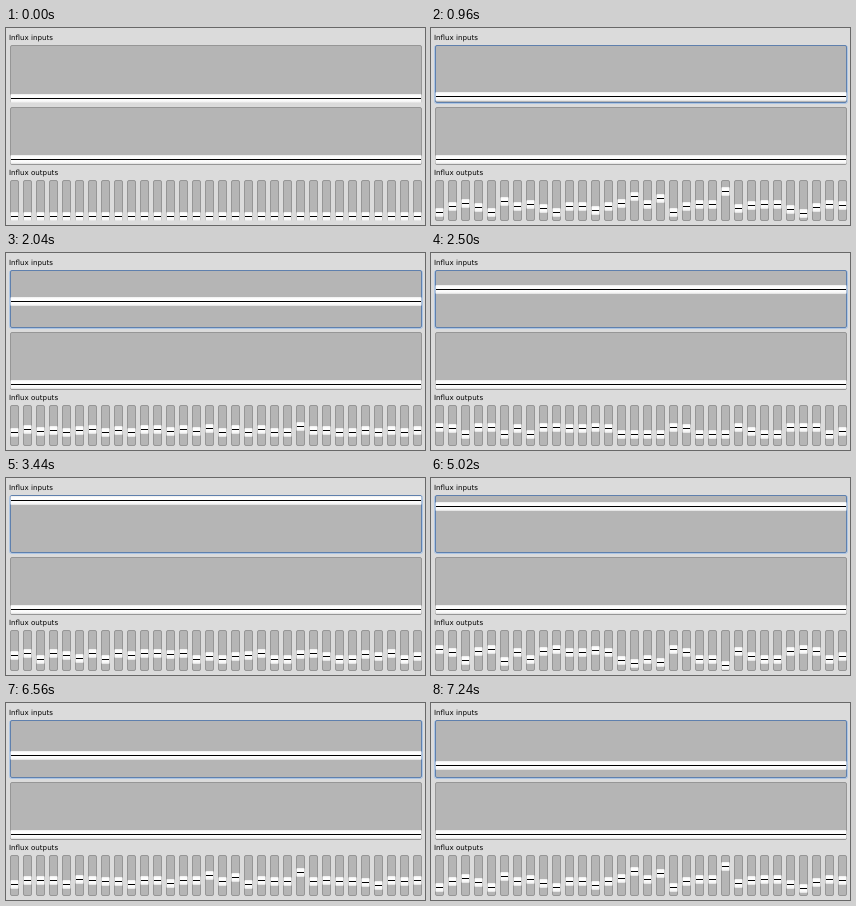
Recreate the animation shown at these times as an HTML page. Size 419 by 197 pixels, loop 8 s.

```html
<!DOCTYPE html>
<html lang="en">
<head>
<meta charset="utf-8">
<title>Influx sliders</title>
<style>
  html, body { margin: 0; width: 100%; height: 100%; overflow: hidden; background: #dbdbdb; }
  svg { display: block; width: 419px; height: 197px; }
  text { font: 7.1px "DejaVu Sans", sans-serif; fill: #000; text-rendering: geometricPrecision; }
  .track { fill: #b5b5b5; stroke: #969696; }
  .focus { stroke: #5f80ad; }
  .glow { fill: none; stroke: #8db6ea; stroke-opacity: .6; }
  .knob { fill: url(#face); }
</style>
</head>
<body>
<svg id="stage" viewBox="0 0 419 197">
  <defs>
    <linearGradient id="face" x1="0" y1="0" x2="0" y2="1">
      <stop offset="0" stop-color="#ececec"/>
      <stop offset=".2" stop-color="#fff"/>
      <stop offset=".8" stop-color="#fafafa"/>
      <stop offset="1" stop-color="#dedede"/>
    </linearGradient>
  </defs>
  <text x="3" y="12">Influx inputs</text>
  <text x="3" y="147">Influx outputs</text>
</svg>
<script>
const LOOP = 8000, GRAB = 500;
const stage = document.getElementById('stage');

function add(name, attrs, parent = stage) {
  const el = document.createElementNS('http://www.w3.org/2000/svg', name);
  for (const key in attrs) el.setAttribute(key, attrs[key]);
  return parent.appendChild(el);
}

function slider(x, y, w, h) {
  const track = add('rect', { class: 'track', x: x + .5, y: y + .5, width: w - 1, height: h - 1, rx: 1.5 });
  const knob = add('g', {});
  add('rect', { class: 'knob', x: x + .5, y: -4, width: w - 1, height: 9, rx: 1 }, knob);
  add('rect', { x: x + 1, y: 0, width: w - 2, height: 1 }, knob);
  return { track, move: pos => knob.setAttribute('transform', `translate(0 ${Math.round(pos)})`) };
}

const glow = add('rect', { class: 'glow', x: 3.5, y: 17.5, width: 413, height: 58, rx: 2 });
const input = slider(4, 17, 412, 58);
slider(4, 79, 412, 58).move(131);

// Strength with which each output follows the input
const weights = [7, 1, -2, 2, 7, -4, 1, -1, 3, 7, 1, 1, 5, 1, -2, -9,
  -1, -7, 7, 1, -1, -1, -14, 3, 0, -1, -1, 4, 8, 2, -1, 0];
const outputs = weights.map((_, i) => slider(4 + 13 * i, 152, 9, 41));

// Drag of the input: start, end, steps, height reached, easing power
const drags = [
  [940, 1660, 15, 54, 2],
  [1760, 2500, 14, 36, 1],
  [2640, 2640, 1, 33, 1],
  [2780, 3440, 9, 22, 1],
  [4560, 5300, 14, 31, 1],
  [5420, 6140, 12, 46, 2],
  [6260, 6980, 13, 60, 1],
  [7080, 7240, 4, 62, 1]
];

const lerp = (a, b, k) => a + (b - a) * k;

function inputAt(t) {
  let y = 68;
  for (const [start, end, steps, to, power] of drags) {
    if (t < start) break;
    const taken = t >= end ? steps : 1 + Math.floor((t - start) / (end - start) * (steps - 1) + 1e-6);
    y = lerp(y, to, (taken / steps) ** power);
  }
  return y;
}

// Outputs flip sides as the input rises, then strong ones swing near the top
function outputAt(weight, y) {
  const flip = Math.min(1, Math.max(0, (60 - y) / 24));
  const swing = -.55 * Math.sin(Math.PI * Math.max(0, 36 - y) / 11);
  return lerp(177 + weight, 177.8 - 3.6 * Math.tanh(1.5 * weight), flip) + swing * weight;
}

function draw(t) {
  const active = t >= GRAB;
  const y = inputAt(t);
  input.track.classList.toggle('focus', active);
  glow.style.display = active ? '' : 'none';
  input.move(active ? y : 70);
  outputs.forEach((out, i) => out.move(active ? outputAt(weights[i], y) : 188));
}

const begin = performance.now();
function tick() {
  draw((performance.now() - begin) % LOOP);
  requestAnimationFrame(tick);
}
tick();
</script>
</body>
</html>
```
